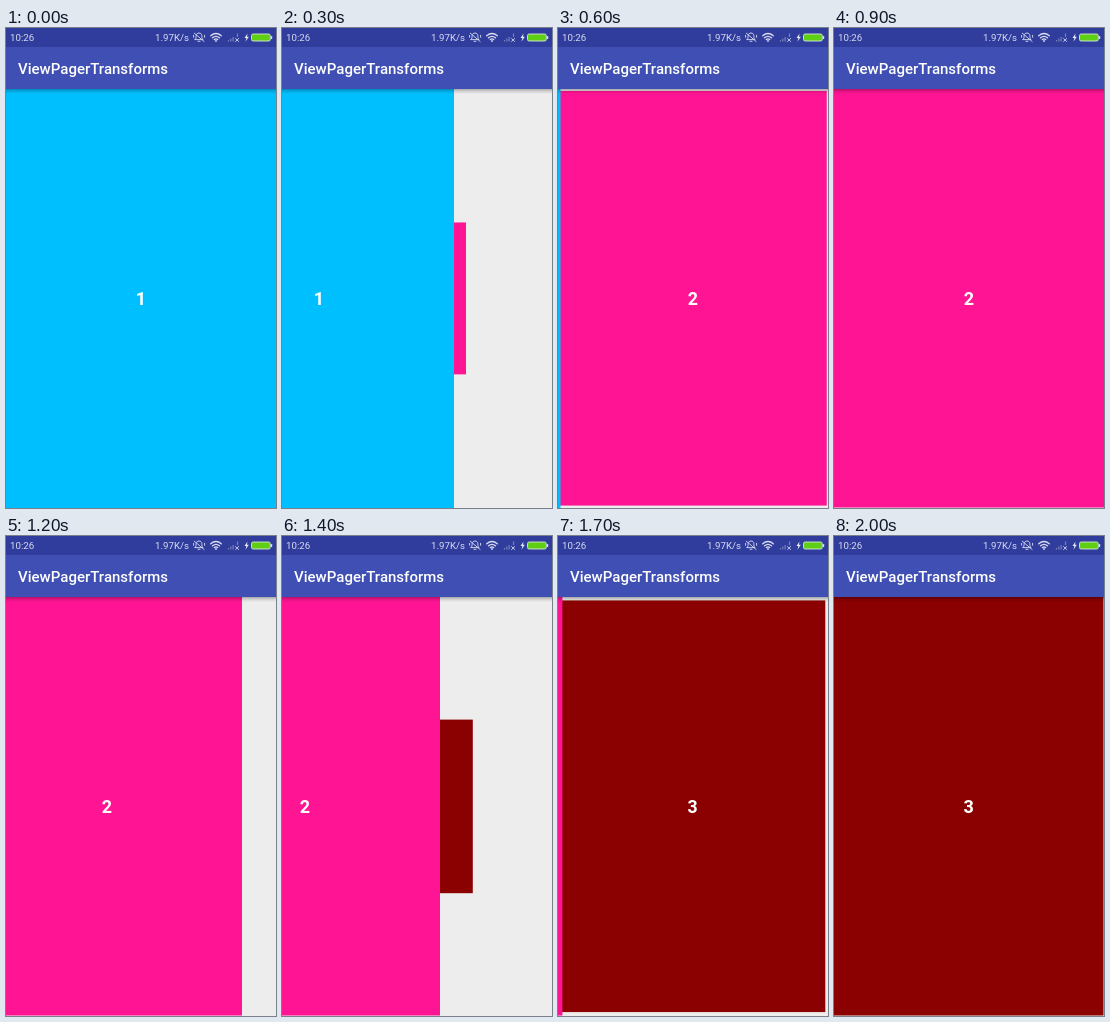
An HTML page that plays this animation: 270 by 480 pixels, repeating every 2100 ms.

```html
<!DOCTYPE html>
<html lang="en">
<head>
<meta charset="utf-8">
<title>ViewPagerTransforms</title>
<style>
/* Pixels each swipe has travelled, 0 to 270 */
@property --a { syntax: "<number>"; inherits: true; initial-value: 0; }
@property --b { syntax: "<number>"; inherits: true; initial-value: 0; }

html, body { margin: 0; width: 100%; height: 100%; overflow: hidden; background: #ededee; }
svg { display: block; width: 100vw; height: 100vh; }
text { font-family: Roboto, "Noto Sans", sans-serif; fill: #fff; }

.pager { animation: first 2100ms step-end infinite, second 2100ms step-end infinite; }
.page { transform-origin: 135px 270.5px; }
.page text { font-size: 18px; font-weight: 700; text-anchor: middle; }
.one { transform: translateX(calc(var(--a) * -1px)); }
.two { transform: translateX(calc(var(--b) * -1px)) scale(calc(var(--a) / 270)); }
.three { transform: scale(calc(var(--b) / 270)); }

.title { font-size: 15px; font-weight: 500; }
.status text { font-size: 9.7px; fill: #d9dcf0; }
.line { fill: none; stroke: #d9dcf0; stroke-linecap: round; stroke-linejoin: round; }

/* Short drag, then a quintic ease-out fling, sampled every 100 ms */
@keyframes first {
  0% { --a: 0; }
  9.52% { --a: 36; }
  14.28% { --a: 98; }
  19.04% { --a: 211; }
  23.80% { --a: 254.5; }
  28.57% { --a: 267.5; }
  33.33% { --a: 269.8; }
  38.09%, 100% { --a: 270; }
}
@keyframes second {
  0% { --b: 0; }
  57.14% { --b: 34; }
  61.90% { --b: 64; }
  66.66% { --b: 112; }
  71.42% { --b: 190.5; }
  76.19% { --b: 247; }
  80.95% { --b: 265.6; }
  85.71% { --b: 269.6; }
  90.47%, 100% { --b: 270; }
}
</style>
</head>
<body>
<svg viewBox="0 0 270 480" preserveAspectRatio="none">
  <defs>
    <linearGradient id="shade" x2="0" y2="1">
      <stop offset="0" stop-color="#000" stop-opacity=".3"/>
      <stop offset=".4" stop-color="#000" stop-opacity=".13"/>
      <stop offset="1" stop-color="#000" stop-opacity="0"/>
    </linearGradient>
  </defs>

  <rect width="270" height="480" fill="#ededee"/>

  <g class="pager">
    <g class="page three">
      <rect y="61" width="269.5" height="418.5" fill="#8b0000"/>
      <text x="134.6" y="277">3</text>
    </g>
    <g class="page two">
      <rect y="61" width="270" height="418.5" fill="#ff1493"/>
      <text x="134.8" y="277">2</text>
    </g>
    <g class="page one">
      <rect y="61" width="270" height="419" fill="#00bfff"/>
      <text x="134.8" y="277">1</text>
    </g>
  </g>

  <rect y="61" width="270" height="5" fill="url(#shade)"/>
  <rect y="18" width="270" height="43" fill="#3f4fb3"/>
  <rect width="270" height="19" fill="#303d9c"/>
  <text class="title" x="12" y="46">ViewPagerTransforms</text>

  <g class="status">
    <text x="4" y="13.3">10:26</text>
    <text x="149" y="13.3">1.97K/s</text>

    <!-- muted bell -->
    <path class="line" stroke-width=".9" d="M189 11.6h8c-1.2-1.2-1.1-2.4-1.1-3.8 0-3.7-5.8-3.7-5.8 0 0 1.400 .1 2.600-1.100 3.800M192 13.300h2M188.300 5.200l9.800 8.300M187.600 7.300v2M198.600 7.300v2"/>

    <!-- wifi -->
    <path class="line" stroke-width="1.3" d="M204.700 7.800q5.300-4.600 10.600 0M206.500 9.800q3.500-2.900 7 0M208.300 11.600q1.700-1.300 3.400 0"/>
    <circle cx="210" cy="13" r=".9" fill="#d9dcf0"/>

    <!-- no signal -->
    <path stroke="#7680bf" stroke-width="1.2" d="M222.500 13.500v-1.500M224.800 13.500v-3M227.100 13.500v-4.500M231.500 9v-3.500"/>
    <path class="line" stroke-width=".9" d="M229.600 10.500l3 3M232.600 10.500l-3 3"/>

    <!-- charging battery -->
    <path fill="#e8eaf6" d="M241.600 5.500l-3.100 4.600h1.900l-.9 3.600 3.300-4.900h-1.900z"/>
    <rect x="245.500" y="6" width="18.800" height="7" rx="1.600" fill="#5fcf16" stroke="#d9e6d8" stroke-width=".9"/>
    <rect x="264.900" y="8" width="1.300" height="3" rx=".5" fill="#d9dcf0"/>
  </g>
</svg>
</body>
</html>
```
